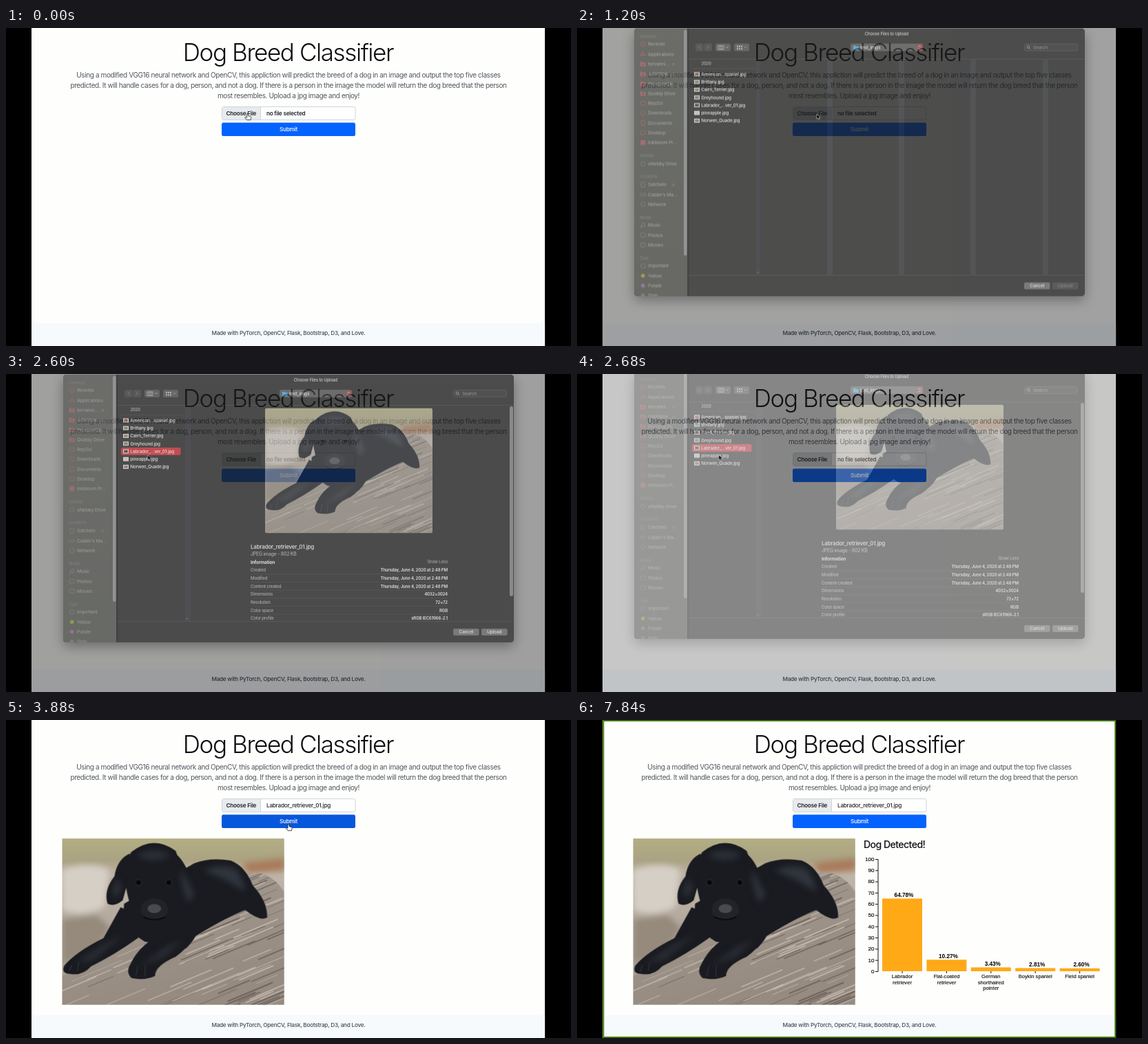
An HTML page that plays this animation: 820x462 px, repeating every 7920 ms.

```html
<!DOCTYPE html>
<html lang="en">
<head>
<meta charset="utf-8">
<title>Dog Breed Classifier</title>
<style>
html, body { margin: 0; width: 100%; height: 100%; overflow: hidden; background: #000; }
svg.stage { display: block; width: 820px; height: 462px; }
text { font-family: Inter, sans-serif; font-optical-sizing: none; letter-spacing: -.03em; white-space: pre; }
.lead text, .title { letter-spacing: -.04em; }
.chart text { font-family: "Liberation Sans", Arial, sans-serif; letter-spacing: 0; }
.mid { text-anchor: middle; }
.end { text-anchor: end; }
.soft { filter: blur(4px); }

/* One loop is 7920 ms, so 1% is 79.2 ms. */
.anim { animation: 7920ms linear infinite; }
.snap { animation: 7920ms step-end infinite; }
.sheet { animation-name: sheet; }
.dim { animation-name: dim; }
.focus { animation-name: focus; }
.veil { animation-name: veil; }
.picked { animation-name: picked; }
.preview { animation-name: preview; }
.empty { animation-name: empty; }
.chosen { animation-name: chosen; }
.photo { animation-name: photo; }
.result { animation-name: result; }
.bars { animation-name: grow; transform-origin: 0 365px; }
.frame { animation-name: frame; }
.choose { animation-name: choose; }
.submit { animation-name: submit; }
.pointer { animation-name: travel; }
.hand { animation-name: hand; }
.arrow { animation-name: arrow; }

@keyframes sheet {
  0%, 13.13% { opacity: 0; transform: translateY(-18px); }
  16.29%, 31.58% { opacity: 1; transform: translateY(0); }
  35.25%, 100% { opacity: 0; transform: translateY(-18px); }
}
@keyframes dim {
  0%, 13.13% { opacity: 0; }
  16.29%, 31.58% { opacity: 1; }
  35.25%, 100% { opacity: 0; }
}
@keyframes focus {
  0%, 15% { opacity: .4; }
  16.29%, 31.58% { opacity: 1; }
  32.5%, 100% { opacity: .4; }
}
@keyframes veil {
  0%, 15% { opacity: .5; }
  16.29%, 31.58% { opacity: 0; }
  32.5%, 100% { opacity: .5; }
}
@keyframes picked { 0% { opacity: 0; } 28.78%, 100% { opacity: 1; } }
@keyframes preview { 0% { opacity: 0; } 29.79%, 100% { opacity: 1; } }
@keyframes empty { 0% { opacity: 1; } 36.36%, 100% { opacity: 0; } }
@keyframes chosen { 0% { opacity: 0; } 36.36%, 100% { opacity: 1; } }
@keyframes photo { 0% { opacity: 0; } 37.37%, 100% { opacity: 1; } }
@keyframes result { 0% { opacity: 0; } 73.73%, 100% { opacity: 1; } }
@keyframes grow {
  0%, 73.73% { transform: scaleY(0); animation-timing-function: cubic-bezier(.65, 0, .35, 1); }
  83.5%, 100% { transform: scaleY(1); }
}
@keyframes frame { 0% { opacity: 0; } 98.98%, 100% { opacity: 1; } }
@keyframes choose {
  0% { fill: #e7ebee; }
  2.5%, 37.9% { fill: #dadee1; }
  39.8%, 100% { fill: #e7ebee; }
}
@keyframes submit {
  0%, 38.8% { fill: #0462fe; }
  40%, 56.5% { fill: #0757dc; }
  58%, 100% { fill: #0462fe; }
}
@keyframes travel {
  0%, .5% { transform: translate(350.5px, 124px); }
  2.52%, 17.68% { transform: translate(348px, 125px); animation-timing-function: ease-in-out; }
  23.23%, 23.7% { transform: translate(206px, 113px); }
  24.24%, 35.86% { transform: translate(205.7px, 117.6px); }
  37.37% { transform: translate(250px, 123px); }
  38.64% { transform: translate(330px, 133px); }
  39.9%, 42.42% { transform: translate(406px, 153px); }
  43.94%, 46.97% { transform: translate(407px, 154px); }
  50.5%, 56.57% { transform: translate(412px, 149px); animation-timing-function: ease-in-out; }
  60.1%, 100% { transform: translate(749px, 80px); }
}
@keyframes hand { 0% { opacity: 1; } 14.14% { opacity: 0; } 38.89% { opacity: 1; } 57.07%, 100% { opacity: 0; } }
@keyframes arrow { 0% { opacity: 0; } 14.14% { opacity: 1; } 38.89% { opacity: 0; } 57.07% { opacity: 1; } 60.6%, 100% { opacity: 0; } }
</style>
</head>
<body>
<svg class="stage" viewBox="0 0 820 462" xmlns="http://www.w3.org/2000/svg">
  <defs>
    <linearGradient id="yard" x2="0" y2="1">
      <stop offset="0" stop-color="#b3ae84"/>
      <stop offset=".13" stop-color="#aba383"/>
      <stop offset=".22" stop-color="#bfb5a9"/>
      <stop offset=".8" stop-color="#a89e92"/>
    </linearGradient>
    <linearGradient id="bark" x2=".3" y2="1">
      <stop offset="0" stop-color="#aaa096"/>
      <stop offset="1" stop-color="#968b81"/>
    </linearGradient>
    <linearGradient id="side" x2="0" y2="1">
      <stop offset="0" stop-color="#393b3a"/>
      <stop offset="1" stop-color="#2e302f"/>
    </linearGradient>
    <clipPath id="win"><rect x="83" y="7" width="654" height="389" rx="5"/></clipPath>
    <clipPath id="pane"><rect x="266" y="52" width="471" height="313"/></clipPath>
    <clipPath id="round"><rect x="376" y="55.5" width="243" height="182" rx="3"/></clipPath>
    <clipPath id="log"><path d="M0 200L60 172L130 130L262 52Q300 42 323 78V242H0Z"/></clipPath>
    <symbol id="pup" viewBox="0 0 323 242">
      <rect width="323" height="242" fill="url(#yard)"/>
      <g class="soft">
        <path d="M0 45Q40 32 68 45L62 100Q30 116 0 104Z" fill="#d6cfc5"/>
        <path d="M0 118L50 112L70 130L40 172L0 180Z" fill="#958a7c"/>
        <path d="M262 36L323 29V46L270 50Z" fill="#a97a5a"/>
      </g>
      <g clip-path="url(#log)">
        <rect width="323" height="242" fill="url(#bark)"/>
        <g id="grain"></g>
      </g>
      <g fill="#191b20">
        <path d="M90 95Q150 60 192 36Q215 27 245 32Q266 40 277 68Q299 92 298 115Q287 121 266 104Q240 114 194 142Q190 150 180 160L120 150Q85 130 90 95Z"/>
        <path d="M85 100L60 145Q20 165 3 185Q-2 197 12 197Q30 200 42 186Q75 170 110 145L125 120Z"/>
        <path d="M195 120Q196 150 165 172Q135 185 135 200Q120 207 101 203Q92 195 99 183Q115 150 150 138Z"/>
        <path d="M98 22Q80 30 76 55Q60 75 66 95Q76 100 88 90Q96 60 104 40Z"/>
        <path d="M100 20Q133-6 165 18Q182 60 170 95Q160 124 133 126Q105 120 97 90Q86 50 100 20Z"/>
        <path d="M160 18Q180 32 186 60Q206 72 200 92Q190 108 178 104Q168 80 162 45Z"/>
      </g>
      <g class="soft">
        <path d="M205 46Q230 36 252 44Q264 58 266 78Q240 60 205 46Z" fill="#30353e"/>
        <path d="M172 44Q184 62 192 80Q188 92 182 92Q172 70 172 44ZM80 56Q72 74 74 86Q82 84 86 72Z" fill="#2e323a"/>
        <path d="M108 24Q133 10 158 24Q134 40 108 24Z" fill="#2b2f37"/>
        <path d="M20 180L62 152L90 140L44 178ZM112 186L150 158L176 146L150 172Z" fill="#2a2d34"/>
      </g>
      <ellipse cx="134" cy="103" rx="20" ry="16" fill="#212329"/>
      <ellipse cx="134" cy="102" rx="10" ry="6.5" fill="#4a4a4e"/>
      <path d="M118 114Q134 122 150 114" fill="none" stroke="#08090b" stroke-width="2"/>
      <g fill="#2e2a29"><circle cx="111" cy="64" r="4.6"/><circle cx="155" cy="64" r="4.6"/></g>
      <g fill="#050608"><circle cx="111" cy="64" r="3.5"/><circle cx="155" cy="64" r="3.5"/></g>
      <path d="M14 184L10 194M24 180L22 193M110 186L107 200M121 185L120 201" stroke="#2b2f36" stroke-width="1.5"/>
    </symbol>
  </defs>

  <rect x="37" width="745.3" height="462" fill="#fefefd"/>
  <rect x="37" y="429" width="745.3" height="33" fill="#f6fafd"/>
  <g id="page"></g>
  <rect x="313.5" y="114.5" width="193.5" height="19" rx="2.5" fill="#fff" stroke="#ced4da"/>
  <path class="anim choose" d="M316 115H369V133H316Q314 133 314 131V117Q314 115 316 115Z"/>
  <path d="M369.5 115V133" stroke="#ced4da"/>
  <rect class="anim submit" x="313" y="137.6" width="194" height="19.4" rx="2.5"/>
  <g id="form"></g>
  <use class="snap photo" href="#pup" x="81.5" y="172" width="322.5" height="242"/>
  <g class="snap result">
    <g id="chart" class="chart"></g>
    <g id="bars" class="anim bars" fill="#ffa917"></g>
    <g id="values" class="chart"></g>
  </g>

  <rect class="anim dim" x="37" width="745.3" height="462" fill="rgba(0,0,0,.57)"/>
  <g class="anim sheet">
    <rect x="83" y="7" width="654" height="389" rx="5" style="filter:drop-shadow(0 6px 9px rgba(0,0,0,.5))"/>
    <g clip-path="url(#win)">
      <rect x="83" y="7" width="654" height="389" fill="#1e1f1e"/>
      <rect x="83" y="7" width="77" height="389" fill="url(#side)"/>
      <rect class="anim veil" x="83" y="7" width="77" height="389" fill="#6b6c62"/>
      <rect x="160" y="7" width="2.5" height="389" fill="#111216"/>
      <rect x="155" y="9" width="4.5" height="328" rx="2" fill="#8b8b8b"/>
      <path d="M162 51.5H737M162 365.5H737" stroke="#343436"/>
      <path d="M167 65.5H259" stroke="#303031"/>
      <path d="M367 52V365M471 52V365M575 52V365M680 52V365" stroke="#292b2e" stroke-width="8"/>
      <path d="M262.5 52V365" stroke="#25262c" stroke-width="5"/>
      <path d="M261.5 360V363M263.5 360V363" stroke="#666" stroke-width=".6"/>
      <g fill="#343535">
        <rect x="172" y="29" width="11.5" height="11" rx="2"/>
        <rect x="184.5" y="29" width="11.5" height="11" rx="2"/>
      </g>
      <g fill="#484949">
        <rect x="201" y="29" width="22" height="11" rx="2"/>
        <rect x="228" y="29" width="22" height="11" rx="2"/>
      </g>
      <path d="M179 32.5L177 34.5L179 36.5M189 32.5L191 34.5L189 36.5" fill="none" stroke="#777"/>
      <path d="M205 32H213V37.5H205ZM207.7 32V37.5M210.3 32V37.5M216.5 33.5L218 35L219.5 33.5M243 33.5L244.5 35L246 33.5" fill="none" stroke="#ccc" stroke-width=".8"/>
      <path d="M232 33H240M232 36.5H240" stroke="#ccc" stroke-width="2" stroke-dasharray="2 1"/>
      <rect x="397" y="29" width="105" height="11" rx="2.5" fill="#515252"/>
      <path d="M401 32H404L405 33H408.5V38H401Z" fill="#43b5ee"/>
      <rect class="anim focus" x="493" y="29.5" width="8.5" height="10" rx="2" fill="#dd2730"/>
      <path d="M495.6 33.7L497.2 32L498.8 33.7M495.6 35.6L497.2 37.3L498.8 35.6" fill="none" stroke="#fff" stroke-width=".8"/>
      <rect x="649.5" y="29.5" width="77" height="10" rx="2.5" fill="#272828" stroke="#454646" stroke-width=".8"/>
      <circle cx="655" cy="34" r="1.9" fill="none" stroke="#aaa" stroke-width=".8"/>
      <path d="M656.5 35.5L658.3 37.3" stroke="#aaa" stroke-width=".8"/>
      <rect class="snap picked" x="167" y="113" width="86.5" height="11" rx="2" fill="#d52028"/>
      <rect x="649" y="376" width="37.5" height="10" rx="2" fill="#656666"/>
      <rect x="690" y="376" width="37.5" height="10" rx="2" fill="#363737"/>
      <g id="sidebar" class="anim focus"></g>
      <g id="finder"></g>
      <g class="snap preview">
        <rect x="690" y="376" width="37.5" height="10" rx="2" fill="#656666"/>
        <rect x="266" y="52" width="471" height="313" fill="#1e1f1e"/>
        <rect x="265" y="52" width="3" height="313" fill="#25262c"/>
        <rect x="731" y="53" width="5" height="276" rx="2.5" fill="#7e7f7f"/>
        <g clip-path="url(#round)"><use href="#pup" x="376" y="55.5" width="243" height="182"/></g>
        <g id="info" clip-path="url(#pane)"></g>
        <g id="upload"></g>
      </g>
    </g>
  </g>

  <rect class="snap frame" x="38.3" y="1" width="743" height="460" fill="none" stroke="#41750f" stroke-width="2"/>
  <path d="M0 0H37V462H0ZM782.3 0H820V462H782.3Z"/>
  <g class="anim pointer">
    <path class="snap hand" d="M-1 .6Q0-.8 1 .6V3.6L4.6 4.6Q5.4 5 5.2 6.4L4.4 9.6H-1L-3.6 6.2Q-3.4 4.8-2.2 5.4L-1 6.4Z" fill="#fff" stroke="#111" stroke-width=".8"/>
    <path class="snap arrow" d="M0 0V7.2L1.7 5.8L2.9 8.4L4.1 7.9L3 5.3H5.2Z" fill="#000" stroke="#eee" stroke-width=".5"/>
  </g>
</svg>
<script>
const put = (id, markup) => document.getElementById(id).insertAdjacentHTML('beforeend', markup);
const text = (x, y, s, size, fill = '#fff', weight = 500, cls = '') =>
  `<text x="${x}" y="${y}" dy=".36em" font-size="${size}" fill="${fill}" font-weight="${weight}" class="${cls}">${s}</text>`;

// Wood grain: seeded streaks that rise to the right
let seed = 7;
const rand = () => (seed = seed * 16807 % 2147483647) / 2147483647;
for (let i = 0; i < 150; i++) {
  const x = rand() * 330 - 30, y = 50 + rand() * 230, len = 20 + rand() * 60;
  put('grain', `<path d="M${x} ${y}l${len} ${-len * .42}" stroke="${i % 2 ? '#c6bcb1' : '#6b6159'}" stroke-width="${.5 + rand() * 1.3}"/>`);
}

// Page
const lead = [
  'Using a modified VGG16 neural network and OpenCV, this appliction will predict the breed of a dog in an image and output the top five classes',
  'predicted. It will handle cases for a dog, person, and not a dog. If there is a person in the image the model will return the dog breed that the person',
  'most resembles. Upload a jpg image and enjoy!'
];
put('page',
  text(409.5, 35.5, 'Dog Breed Classifier', 35, '#0d0f11', 300, 'mid title') +
  `<g class="lead">${lead.map((s, i) => text(410, 68 + i * 15.2, s, 10.02, '#50575e', 400, 'mid')).join('')}</g>` +
  text(410, 443.3, 'Made with PyTorch, OpenCV, Flask, Bootstrap, D3, and Love.', 8.2, '#454b52', 500, 'mid'));
put('form',
  text(341.3, 124, 'Choose File', 8.2, '#212529', 600, 'mid') +
  text(378, 124, 'no file selected', 8.2, '#212529', 600, 'snap empty') +
  text(378, 124, 'Labrador_retriever_01.jpg', 8.2, '#212529', 500, 'snap chosen') +
  text(410, 147.3, 'Submit', 8.2, '#fff', 500, 'mid'));

// Chart
const yOf = v => 365 - v * 1.63;
const breeds = [
  [64.78, 'Labrador', 'retriever'],
  [10.27, 'Flat-coated', 'retriever'],
  [3.43, 'German', 'shorthaired', 'pointer'],
  [2.81, 'Boykin spaniel'],
  [2.6, 'Field spaniel']
];
put('chart', '<path d="M433 202.5H437V365.5H433" fill="none" stroke="#111"/>');
for (let v = 0; v <= 100; v += 10) {
  put('chart', `<path d="M433 ${yOf(v) + .5}H437" stroke="#111"/>` +
    `<g stroke="#111" stroke-width=".2">${text(431.5, yOf(v), v, 8, '#111', 400, 'end')}</g>`);
}
breeds.forEach(([v, ...lines], i) => {
  const x = 443 + i * 64.4, mid = x + 29;
  put('bars', `<rect x="${x}" y="${yOf(v)}" width="58" height="${365 - yOf(v)}"/>`);
  put('values', text(mid + 2.5, yOf(v) - 5.3, v.toFixed(2) + '%', 8.2, '#000', 700, 'mid'));
  put('chart', `<path d="M${mid} 365V368" stroke="#111"/><g stroke="#111" stroke-width=".15">` +
    lines.map((s, n) => text(mid, 372.7 + n * 8.3, s, 7.6, '#111', 400, 'mid')).join('') + '</g>');
});
// The heading keeps the page font.
document.getElementById('bars').insertAdjacentHTML('beforebegin',
  text(416, 181, 'Dog Detected!', 14.1, '#0d0f11', 500, 'title'));

// File dialog
const icon = {
  ring: (y, c) => `<circle cx="95.7" cy="${y}" r="3.2" fill="none" stroke="${c}" stroke-width=".9"/>`,
  dot: (y, c) => `<circle cx="95.7" cy="${y}" r="2.8" fill="${c}"/>`,
  box: (y, c) => `<rect x="92.2" y="${y - 2.7}" width="7" height="5.4" rx=".8" fill="none" stroke="${c}" stroke-width=".9"/>`,
  bar: (y, c) => `<rect x="91.7" y="${y - 1.5}" width="8" height="3" rx=".6" fill="none" stroke="${c}" stroke-width=".8"/>`,
  page: (y, c) => `<rect x="93" y="${y - 3.4}" width="5.4" height="6.8" rx=".6" fill="none" stroke="${c}" stroke-width=".9"/>`,
  tile: (y, c) => `<rect x="92.2" y="${y - 3.5}" width="7" height="7" fill="${c}"/>`,
  folder: (y, c) => `<path d="M91.7 ${y - 3}h3l1 1h4v5.4h-8z" fill="${c}"/><circle cx="95.7" cy="${y + .8}" r="1.1" fill="#5a2527"/>`,
  tent: (y, c) => `<path d="M92.6 ${y + 3}l3.1-6.2l3.1 6.2M92 ${y + 1}h7.4" fill="none" stroke="${c}" stroke-width=".9"/>`,
  note: (y, c) => `<path d="M94 ${y + 2.3}v-4.6l4-1v4.6" fill="none" stroke="${c}" stroke-width=".9"/><circle cx="93.2" cy="${y + 2.4}" r="1.1" fill="${c}"/><circle cx="97.2" cy="${y + 1.5}" r="1.1" fill="${c}"/>`
};
const red = '#ff5a60', gray = '#a2a3a3';
const sections = [
  ['Favorites', 18.5, 30, red, [
    ['ring', 'Recents'], ['tent', 'Applications'], ['folder', 'torvanni...', 1], ['folder', 'caldrepw...', 1],
    ['folder', 'Personal Dr...'], ['folder', 'Quobly Drive'], ['box', 'RepZol'], ['ring', 'Downloads'],
    ['page', 'Documents'], ['box', 'Desktop'], ['tile', 'Inkbloom Pr...']]],
  ['oNebby', 191.5, 203.5, gray, [['ring', 'oNebby Drive']]],
  ['Locations', 222, 234, gray, [['page', 'Satchelo', 1], ['bar', "Calder's Ma..."], ['ring', 'Network']]],
  ['Media', 281.5, 293, gray, [['note', 'Music'], ['box', 'Photos'], ['box', 'Movies']]],
  ['Tags', 340.5, 352, gray, [
    ['ring', 'Important'], ['dot', 'Yellow', 0, '#fff000'], ['dot', 'Purple', 0, '#e57af0'], ['dot', 'Gray', 0, '#98989d']]]
];
for (const [head, headY, top, tint, items] of sections) {
  put('sidebar', text(91, headY, head, 5.8, '#8d8e8e', 600));
  items.forEach(([kind, label, eject, color], i) => {
    const y = top + i * 14.28;
    put('sidebar', icon[kind](y, color || tint) + text(103, y, label, 6.8, '#f0f0f0') +
      (eject ? `<path d="M138 ${y + .4}l2.2-2.6l2.2 2.6zM138 ${y + 1.2}h4.4v.9h-4.4z" fill="#8f9090"/>` : ''));
  });
}
const files = [
  ['American...spaniel.jpg', '#a5574b'], ['Brittany.jpg', '#777c6d'], ['Cairn_Terrier.jpg', '#8d7c58'],
  ['Greyhound.jpg', '#6c7d58'], ['Labrador_...ver_01.jpg', '#2b2e30'], ['pineapple.jpg', '#d8d4c0'], ['Norwen_Quade.jpg', '#8e6e68']
];
files.forEach(([name, tone], i) => {
  const y = 73.5 + i * 11.25;
  put('finder', `<rect x="170" y="${y - 3}" width="8" height="6" fill="#e8e8e6"/>` +
    `<rect x="171.2" y="${y - 1.8}" width="5.6" height="3.6" fill="${tone}"/>` + text(180.3, y, name, 6.5));
});
put('finder',
  text(449.3, 15.3, 'Choose Files to Upload', 6.1, '#e6e6e6', 500, 'mid') +
  text(411, 34.6, 'test_imgs', 6.8) + text(662, 34.6, 'Search', 6.6, '#858686') +
  text(180.5, 58.3, '2020', 5.8, '#b0b0b0', 600) +
  text(667.7, 381, 'Cancel', 6.7, '#fff', 500, 'mid') + text(708.7, 381, 'Upload', 6.7, '#747575', 500, 'mid'));
put('upload', text(708.7, 381, 'Upload', 6.7, '#fff', 500, 'mid'));

const stamp = 'Thursday, June 4, 2020 at 2:48 PM';
const facts = [
  ['Created', stamp], ['Modified', stamp], ['Content created', stamp], ['Dimensions', '4032×3024'],
  ['Resolution', '72×72'], ['Color space', 'RGB'], ['Color profile', 'sRGB IEC61966-2.1']
];
put('info',
  text(355, 256.7, 'Labrador_retriever_01.jpg', 8.1, '#fff', 500) +
  text(355, 267.3, 'JPEG image - 802 KB', 6.9, '#b4b5b5') +
  text(355, 279.2, 'Information', 6.6, '#fff', 700) + text(641, 279.2, 'Show Less', 6.1, '#a5a6a6', 500, 'end'));
facts.forEach(([key, value], i) => {
  const y = 291 + i * 11.7;
  put('info', text(355, y, key, 6.1, '#b4b5b5') + text(641, y, value, 6.1, '#fff', 600, 'end') +
    `<path d="M355 ${y + 5.8}H641" stroke="#3c3d3d" stroke-width=".6"/>`);
});
</script>
</body>
</html>
```
